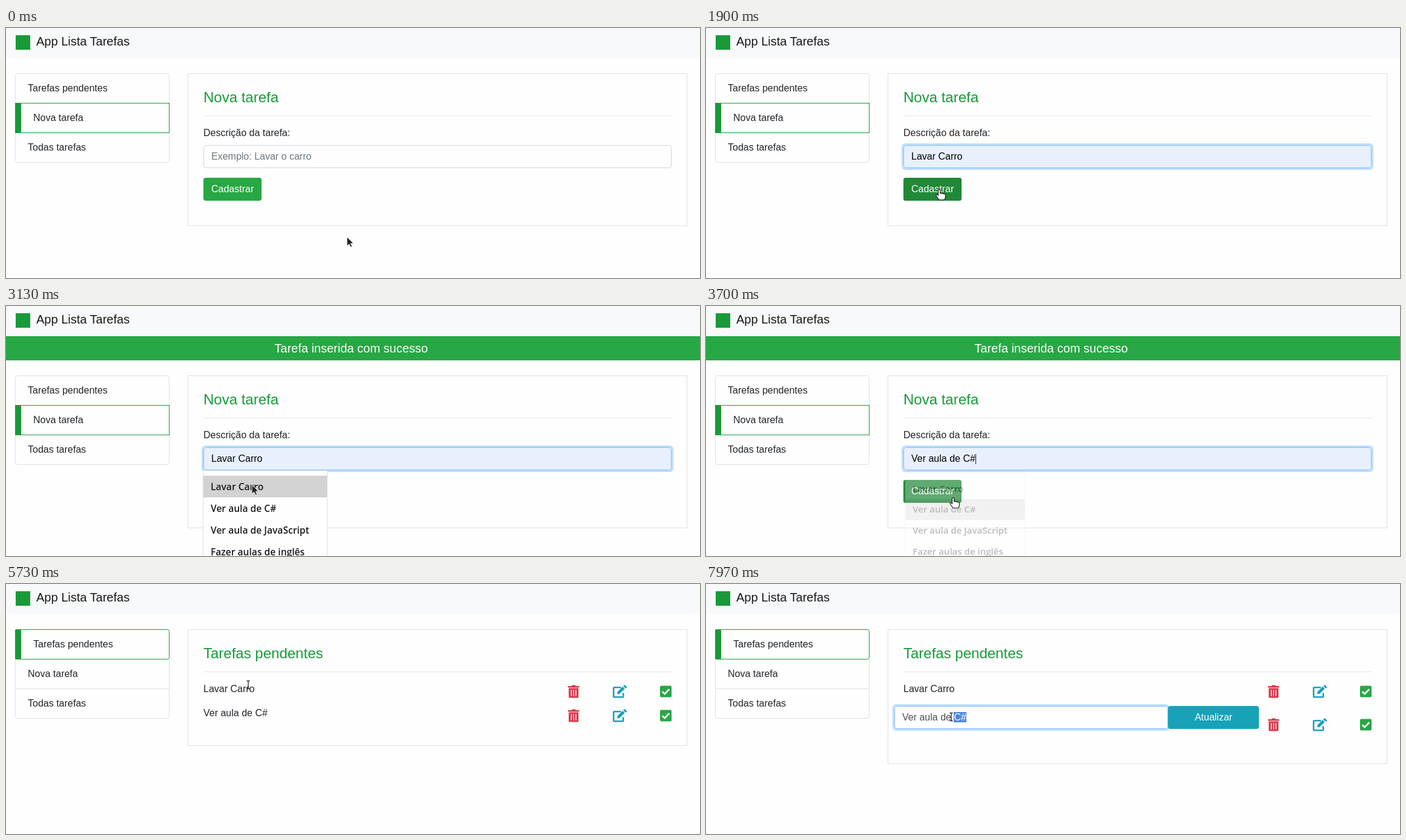
Write an HTML page that moves like this. It is 1146 by 414 pixels and loops after 8 s.

```html
<!DOCTYPE html>
<html lang="pt-BR">
<head>
<meta charset="utf-8">
<title>App Lista Tarefas</title>
<style>
html, body { margin: 0; width: 100%; height: 100%; overflow: hidden; background: #fefefe; }
svg { display: block; width: 1146px; height: 414px; }
text { font-family: "Liberation Sans", Arial, sans-serif; white-space: pre; }
.menu text { font: 600 15.6px "Open Sans", sans-serif; }
</style>
</head>
<body>
<svg id="stage" viewBox="0 0 1146 414"></svg>
<script>
const LOOP = 8000;
const INK = '#212529', GREEN = '#28a745', HOVER = '#218838', ACCENT = '#189a38',
      TEAL = '#17a2b8', RED = '#dc3545', LINE = '#dfdfdf', FIELD = '#ced4da',
      FOCUS = '#80bdff', MUTED = '#6c757d', TINT = '#e8f0fe', PAGE = '#fefefe';

// Moments when the page changes
const SAVED = 2150, SAVED_AGAIN = 4000, PENDING = 5080, EDIT = 6950, GRAB = 7790;

const menus = [
  { open: 530, close: 1150, pick: 0, focus: 590, end: SAVED },
  { open: 2530, close: 3630, pick: 1, focus: 2600, end: SAVED_AGAIN }
];
const entries = ['Lavar Carro', 'Ver aula de C#', 'Ver aula de JavaScript',
                 'Fazer aulas de inglês', 'Comprar pão'];

// Pointer route: time, x, y, shape until the next point
const route = [
  [0, 563, 346, 'arrow'], [120, 563, 346, 'arrow'], [450, 430, 232, 'beam'],
  [560, 405, 213, 'beam'], [700, 400, 222, 'beam'], [820, 390, 240, 'arrow'],
  [1000, 384, 262, 'arrow'], [1150, 384, 262, 'hand'], [1500, 385, 267, 'hand'],
  [2150, 385, 267, 'beam'], [2350, 392, 262, 'beam'], [2530, 402, 252, 'beam'],
  [2800, 402, 252, 'beam'], [2950, 404, 273, 'arrow'], [3300, 408, 318, 'arrow'],
  [3630, 408, 317, 'hand'], [4230, 408, 317, 'arrow'], [4430, 208, 197, 'arrow'],
  [4750, 115, 140, 'hand'], [5080, 115, 140, 'hand'], [5250, 120, 142, 'arrow'],
  [5500, 320, 160, 'arrow'], [5650, 400, 167, 'beam'], [5860, 400, 167, 'arrow'],
  [6200, 640, 210, 'arrow'], [6670, 996, 216, 'arrow'], [6760, 1010, 218, 'hand'],
  [7000, 1010, 218, 'arrow'], [7200, 960, 225, 'arrow'], [7500, 770, 222, 'beam'],
  [7760, 432, 220, 'beam'], [7830, 432, 220, 'beam'], [7950, 405, 220, 'beam'],
  [LOOP, 405, 220, 'beam']
];

const clamp = v => Math.max(0, Math.min(1, v));
const ramp = (t, start, ms) => clamp((t - start) / ms);

const text = (x, y, str, fill = INK, size = 16, extra = '') =>
  `<text x="${x}" y="${y}" font-size="${size}" fill="${fill}" ${extra}>${str}</text>`;
const box = (x, y, w, h, fill, r = 0, extra = '') =>
  `<rect x="${x}" y="${y}" width="${w}" height="${h}" rx="${r}" fill="${fill}" ${extra}/>`;
const frame = (x, y, w, h, stroke, r = 0, fill = 'none') =>
  box(x + .5, y + .5, w - 1, h - 1, fill, r, `stroke="${stroke}"`);
const group = (x, y, body, extra = '') =>
  `<g transform="translate(${x} ${y})" ${extra}>${body}</g>`;

function pointer(t) {
  const i = route.findIndex((p, n) => n + 1 === route.length - 1 || t < route[n + 1][0]);
  const [t0, x0, y0, shape] = route[i], [t1, x1, y1] = route[i + 1];
  const k = ramp(t, t0, t1 - t0);
  return { x: x0 + (x1 - x0) * k, y: y0 + (y1 - y0) * k, shape };
}

const shapes = {
  arrow: '<path d="M0 0V15L3.6 11.8L6 17L8.6 15.8L6.3 10.8H11Z" fill="#222" stroke="#fff" stroke-width=".9"/>',
  beam: '<path d="M-2.500-6.500H-.7L0-6L.7-6.500H2.500M0-6V6M-2.500 6.500H-.7L0 6L.7 6.500H2.500" fill="none" stroke="#222" stroke-width="1.300"/>',
  hand: '<path d="M-1.500 1.500Q0-.8 1.600 1.500V7Q3.500 5.600 4.600 7.300Q6.500 6.200 7.600 8Q10.500 7.400 10.500 10V13L9 17.500H0L-4.500 11.500Q-5.500 9.800-4.500 9.300Q-3 8.300-1.500 10.500Z" fill="#fff" stroke="#222" stroke-width="1.200" stroke-linejoin="round"/>'
};

const ring = (x, y, w, h, k) => k
  ? box(x - 1.5, y - 1.5, w + 3, h + 3, 'none', 5, `stroke="#bfdeff" stroke-width="3.200" opacity="${k}"`) : '';

function sidebar(active) {
  const top = [75, 124][active];
  let out = frame(15, 75, 255, 148, LINE, 4) + box(15, 173, 255, 1, LINE);
  out += frame(15, top, 255, 50, ACCENT, active ? 0 : 3, PAGE) + box(15, top, 10, 50, ACCENT, active ? 0 : 2);
  ['Tarefas pendentes', 'Nova tarefa', 'Todas tarefas'].forEach((s, i) =>
    out += text(i === active ? 45 : 36, 105 + 49 * i, s));
  return out;
}

const card = (title, height) =>
  frame(300, 75, 825, height, LINE) + text(326, 123, title, ACCENT, 24) + box(326, 145, 773, 1, '#e5e5e5');

function newTask(t, row, menu) {
  const picked = menu && t >= menu.close;
  const value = picked ? entries[menu.pick] : row >= 0 ? entries[row] : '';
  const focus = menu ? ramp(t, menu.focus, 150) : 0;
  const since = menu ? t - (picked ? menu.close : menu.open) : 0;
  const caretX = picked ? [424, 445][menu.pick] : 339;
  const hover = t < SAVED ? ramp(t, 1160, 150) : ramp(t, 3600, 100) - ramp(t, 4440, 150);
  let out = card('Nova tarefa', 253) + text(326, 179, 'Descrição da tarefa:');
  out += ring(326, 194, 773, 38, focus);
  out += frame(326, 194, 773, 38, focus ? FOCUS : FIELD, 4, value ? TINT : PAGE);
  out += text(339, 218, value || 'Exemplo: Lavar o carro', value ? '#000' : MUTED);
  if (menu && since % 1000 < 500 && (picked || !value)) out += box(caretX, 205, 1, 17, INK);
  out += box(326, 248, 96, 38, GREEN, 4) + box(326, 248, 96, 38, HOVER, 4, `opacity="${hover}"`);
  return out + text(339, 272, 'Cadastrar', '#fff');
}

function suggestions(t, row, menu) {
  const gone = ramp(t, menu.close, 100);
  const shown = ramp(t, menu.open, 90) * (1 - gone);
  if (!shown) return '';
  let out = box(325.5, 232.5, 205, 238, PAGE, 1, `stroke="${LINE}"`);
  const lit = t >= menu.close ? menu.pick : row;
  if (lit >= 0) out += box(326, 241 + 36 * lit, 204, 36, '#d2d2d2');
  entries.forEach((s, i) => out += text(338, 264.5 + 36 * i, s, '#1c1c1c'));
  const scale = .95 + .05 * shown;
  return `<g class="menu" opacity="${shown}" transform="translate(428 352) scale(${scale}) translate(-428 -352)">${out}</g>`;
}

// Row icons, placed by the row's middle line
const trash = `<path d="M0-9H6L7-10.500H12L13-9H18.500V-6.500H0ZM1.300-5.500H17.300V9Q17.300 10.500 15.700 10.500H3Q1.300 10.500 1.300 9Z" fill="${RED}"/>
  <path d="M5.500-2.800V7.700M9.300-2.800V7.700M13.100-2.800V7.700" stroke="${PAGE}" stroke-width="1.400"/>`;
const pencil = `<path d="M13.500-6.700H2.500Q1.300-6.700 1.300-5.500V8Q1.300 9.300 2.500 9.300H16Q17.300 9.300 17.300 8V2.500" fill="none" stroke="${TEAL}" stroke-width="2.600"/>
  <path d="M7.200 4.300L7.700.4L16.200-8.100L19.700-4.600L11.200 3.900ZM17.100-9L18.500-10.300Q19.500-11 20.500-10.300L23-7.800Q23.800-6.800 23-5.800L20.600-5.500Z" fill="${TEAL}"/>`;
const check = box(0, -9.5, 19, 19, GREEN, 2) +
  `<path d="M3.800.2L7.700 4L15.300-3.700" fill="none" stroke="${PAGE}" stroke-width="2.700"/>`;
const icons = y => group(928, y, trash) + group(1002, y, pencil) + group(1080, y, check);

function editor(t, x) {
  const focus = ramp(t, GRAB, 120);
  let out = ring(311, 202, 452, 38, focus) + frame(311, 202, 452, 38, focus ? FOCUS : FIELD, 4, PAGE);
  out += box(763, 202, 150, 38, TEAL, 4) + text(838, 226, 'Atualizar', '#fff', 16, 'text-anchor="middle"');
  out += text(324, 226, 'Ver aula de C#', '#495057');
  const from = t < GRAB ? 430 : x < 415 ? 409 : x < 426 ? 421 : 430;
  if (from < 430) {
    out += box(from, 212, 430 - from, 17, '#4f87dc');
    out += text(430, 226, from < 421 ? 'C#' : '#', '#fff', 16, 'text-anchor="end"');
  } else if (t >= GRAB) out += box(430, 212, 1, 17, INK);
  return out;
}

function pending(t, x) {
  const editing = t >= EDIT;
  return card('Tarefas pendentes', editing ? 223 : 193) + text(326, 179, 'Lavar Carro') + icons(178) +
    (editing ? editor(t, x) + icons(233) : text(326, 219, 'Ver aula de C#') + icons(218));
}

function draw(t) {
  const p = pointer(t);
  const banner = t >= SAVED && t < PENDING;
  const shift = banner ? 40 : 0;
  const menu = menus.find(m => t >= m.open && t < m.end);
  let row = -1;
  if (menu && t < menu.close && p.x > 326 && p.x < 530)
    row = Math.max(-1, Math.floor((p.y - shift - 241) / 36));

  let out = box(0, 0, 1146, 414, PAGE) + box(0, 0, 1146, 50, '#f8f9fa');
  out += box(16, 12, 24, 24, ACCENT) + text(50, 29, 'App Lista Tarefas', '#191919', 20);
  if (banner) {
    out += box(0, 50, 1146, 40, GREEN);
    out += text(570, 77, 'Tarefa inserida com sucesso', '#fff', 20, 'text-anchor="middle"');
  }
  const onPending = t >= PENDING;
  out += group(0, shift, sidebar(onPending ? 0 : 1) +
    (onPending ? pending(t, p.x) : newTask(t, row, menu)) +
    (menu ? suggestions(t, row, menu) : ''));
  return out + group(p.x, p.y, shapes[p.shape]);
}

const stage = document.getElementById('stage');
function tick() {
  stage.innerHTML = draw(performance.now() % LOOP);
  requestAnimationFrame(tick);
}
tick();
</script>
</body>
</html>
```
